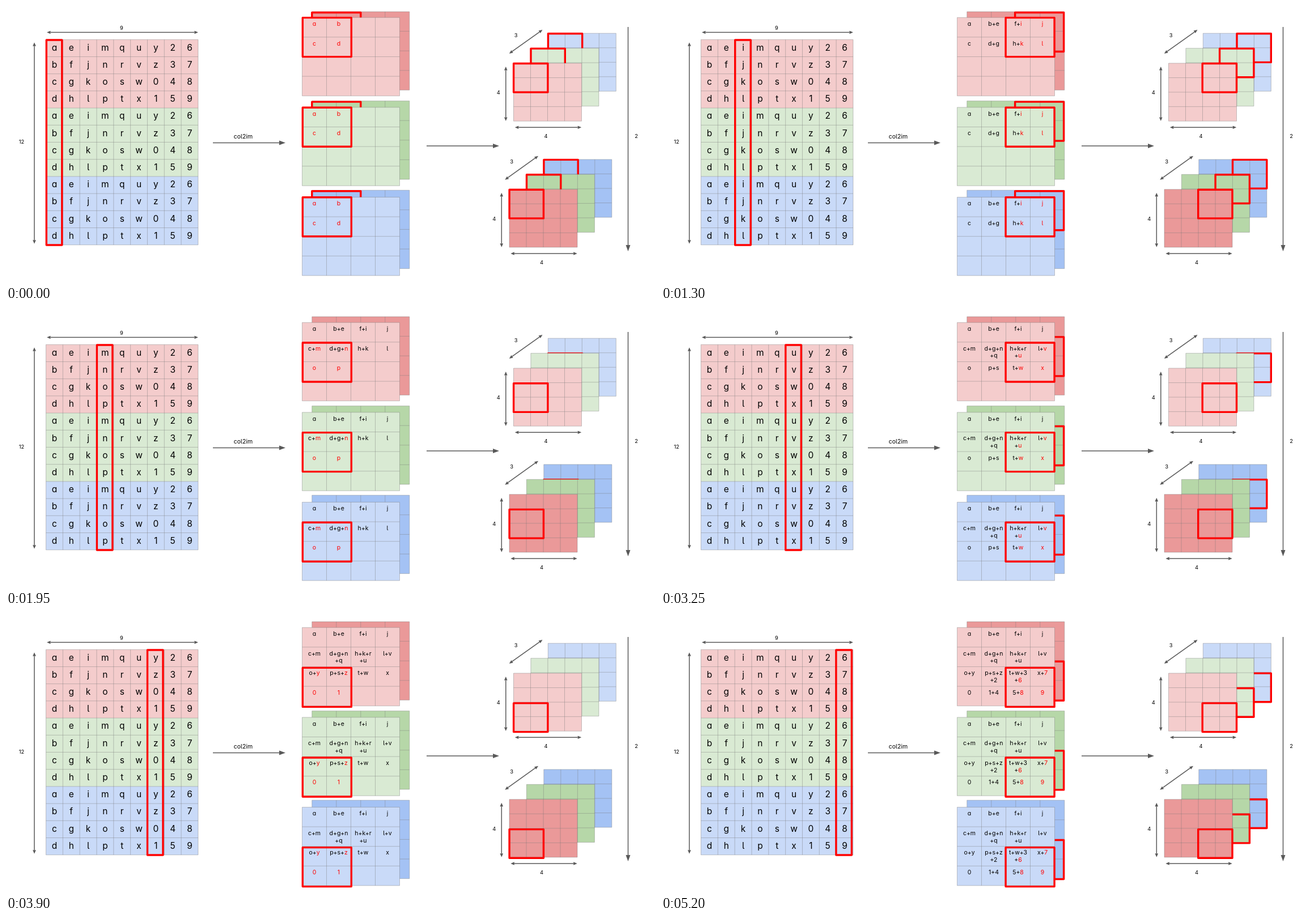
An HTML page for the animation above (5.85 s loop, 1145x489 px).

```html
<!DOCTYPE html>
<html lang="en">
<head>
<meta charset="utf-8">
<title>col2im</title>
<style>
  html, body { margin: 0; width: 100%; height: 100%; overflow: hidden; background: #fff; }
  svg { display: block; width: 1145px; height: 489px; }
  text {
    font-family: Inter, "Noto Sans", sans-serif;
    font-feature-settings: "cv05", "cv11";
    text-anchor: middle;
    fill: #000;
  }
  .hot { fill: #f00; }
  .grid { fill: none; stroke: #777; stroke-opacity: .5; stroke-width: .8; }
  .win { fill: none; stroke: #f00; stroke-width: 3.4; stroke-linejoin: round; }
  .arrow { stroke: #595959; stroke-width: 1.5; }
  .head { fill: #595959; }
</style>
</head>
<body>
<svg id="stage" viewBox="0 0 1145 489"></svg>
<script>
const STEP = 650, STEPS = 9;
const CHARS = 'abcdefghijklmnopqrstuvwxyz0123456789';
const LIGHT = ['#f4cccc', '#d9ead3', '#c9daf8'];
const DARK = ['#ea9999', '#b6d7a8', '#a4c2f4'];

const times = (n, fn) => Array.from({ length: n }, (_, i) => fn(i));
const join = (n, fn) => times(n, fn).join('');
const hot = s => `<tspan class="hot">${s}</tspan>`;
const text = (s, x, y, size = 9.3) => `<text x="${x}" y="${y}" font-size="${size}">${s}</text>`;
const rect = (x, y, w, h, attrs) => `<rect x="${x}" y="${y}" width="${w}" height="${h}" ${attrs}/>`;

function grid(x, y, cols, rows, cw, ch, fill) {
  const lines = join(cols + 1, i => `M${x + i * cw} ${y}v${rows * ch}`) +
    join(rows + 1, j => `M${x} ${y + j * ch}h${cols * cw}`);
  return (fill ? rect(x, y, cols * cw, rows * ch, `fill="${fill}"`) : '') + `<path class="grid" d="${lines}"/>`;
}

// The window slides over a 3 by 3 set of places, row by row
const pane = (k, x, y, dx, dy, w, h) =>
  rect(x + k % 3 * dx, y + Math.floor(k / 3) * dy, w, h, 'class="win"');

function head(x, y, angle, len, half) {
  const deg = angle * 180 / Math.PI;
  return `<path class="head" transform="translate(${x} ${y}) rotate(${deg})" d="M0 0L${-len} ${-half}V${half}Z"/>`;
}

function arrow(x1, y1, x2, y2, both) {
  const a = Math.atan2(y2 - y1, x2 - x1);
  const len = both ? 6.5 : 11, half = both ? 2.8 : 4;
  const cx = Math.cos(a) * len, cy = Math.sin(a) * len;
  const sx = both ? x1 + cx : x1, sy = both ? y1 + cy : y1;
  return `<line class="arrow" x1="${sx}" y1="${sy}" x2="${x2 - cx}" y2="${y2 - cy}"/>` +
    head(x2, y2, a, len, half) + (both ? head(x1, y1, a + Math.PI, len, half) : '');
}

function table(k) {
  const x = 70.5, y = 59.3, cw = 29.83, ch = 30.2;
  return join(3, i => rect(x, y + i * 4 * ch, 9 * cw, 4 * ch, `fill="${LIGHT[i]}"`)) +
    grid(x, y, 9, 12, cw, ch) +
    join(9, c => join(12, r => text(CHARS[c * 4 + r % 4], x + (c + .5) * cw, y + r * ch + 19.3, 15.5))) +
    rect(x + .8 + k * 29.7, y + .7, 27.5, 362, 'class="win"') +
    arrow(x + 1.5, y - 12.8, x + 9 * cw, y - 12.8, true) + text('9', 204, 41.5) +
    arrow(x - 20.5, y + 5, x - 20.5, y + 12 * ch - 2, true) + text('12', 27.5, 243);
}

// Sums collected in each cell of the 4 by 4 plane up to step k
function sums(k) {
  const cells = times(16, () => []);
  for (let n = 0; n <= k; n++)
    for (let i = 0; i < 4; i++) {
      const r = (n / 3 | 0) + (i >> 1), c = n % 3 + i % 2, ch = CHARS[n * 4 + i];
      cells[r * 4 + c].push(n === k ? hot(ch) : ch);
    }
  return cells;
}

function planes(k) {
  const cells = sums(k), cw = 43, ch = 34.6;
  return join(3, i => {
    const x = 522.5, y = 20.3 + i * 158.6, bx = 539.8, by = 10 + i * 157.6;
    const words = cells.map((list, n) => {
      const tx = x + (n % 4 + .5) * cw, ty = y + (n >> 2) * ch + 14.6;
      return (list.length ? text(list.slice(0, 3).join('+'), tx, ty, 10.5) : '') +
        (list[3] ? text('+' + list[3], tx, ty + 12.8, 10.5) : '');
    }).join('');
    return grid(bx, by, 4, 4, cw, ch, DARK[i]) + pane(k, bx, by + 1.5, 42.4, 34.4, 86, 69) +
      grid(x, y, 4, 4, cw, ch, LIGHT[i]) + words + pane(k, x + .8, y + .3, 42.4, 35.4, 86, 69);
  });
}

// Three layers, drawn from the rearmost to the nearest, with their measures
function stack(k, x, y, tone) {
  const layers = join(3, i => {
    const depth = 2 - i, lx = x + depth * 30.4, ly = y - depth * 26.4;
    const covered = depth === 1 && k > 2 && k < 8;
    return grid(lx, ly, 4, 4, 30, 25.55, tone[depth]) +
      (covered ? '' : pane(k, lx + .1, ly + .5, 29.8, 26.2, 60.3, 50.7));
  });
  return layers +
    arrow(x - 7.7, y - 17, x + 51, y - 59, true) + text('3', x + 4, y - 45.8) +
    arrow(x - 13.7, y + 6, x - 13.7, y + 102, true) + text('4', x - 26.7, y + 55) +
    arrow(x + 2.3, y + 113.3, x + 119.7, y + 113.3, true) + text('4', x + 57, y + 132.2);
}

const flow = arrow(365, 241.5, 493, 241.5) + text('col2im', 418.5, 234, 10.5) +
  arrow(742, 247, 870, 247) + arrow(1097.5, 37, 1097.5, 433) + text('2', 1112, 232.5);

const scenes = times(STEPS, k => flow + table(k) + planes(k) +
  stack(k, 895.5, 101, LIGHT) + stack(k, 888, 323.7, DARK));
const stage = document.getElementById('stage');
let shown = -1;

function draw() {
  const k = Math.floor(performance.now() / STEP) % STEPS;
  if (k !== shown) stage.innerHTML = scenes[shown = k];
  requestAnimationFrame(draw);
}
draw();
</script>
</body>
</html>
```
